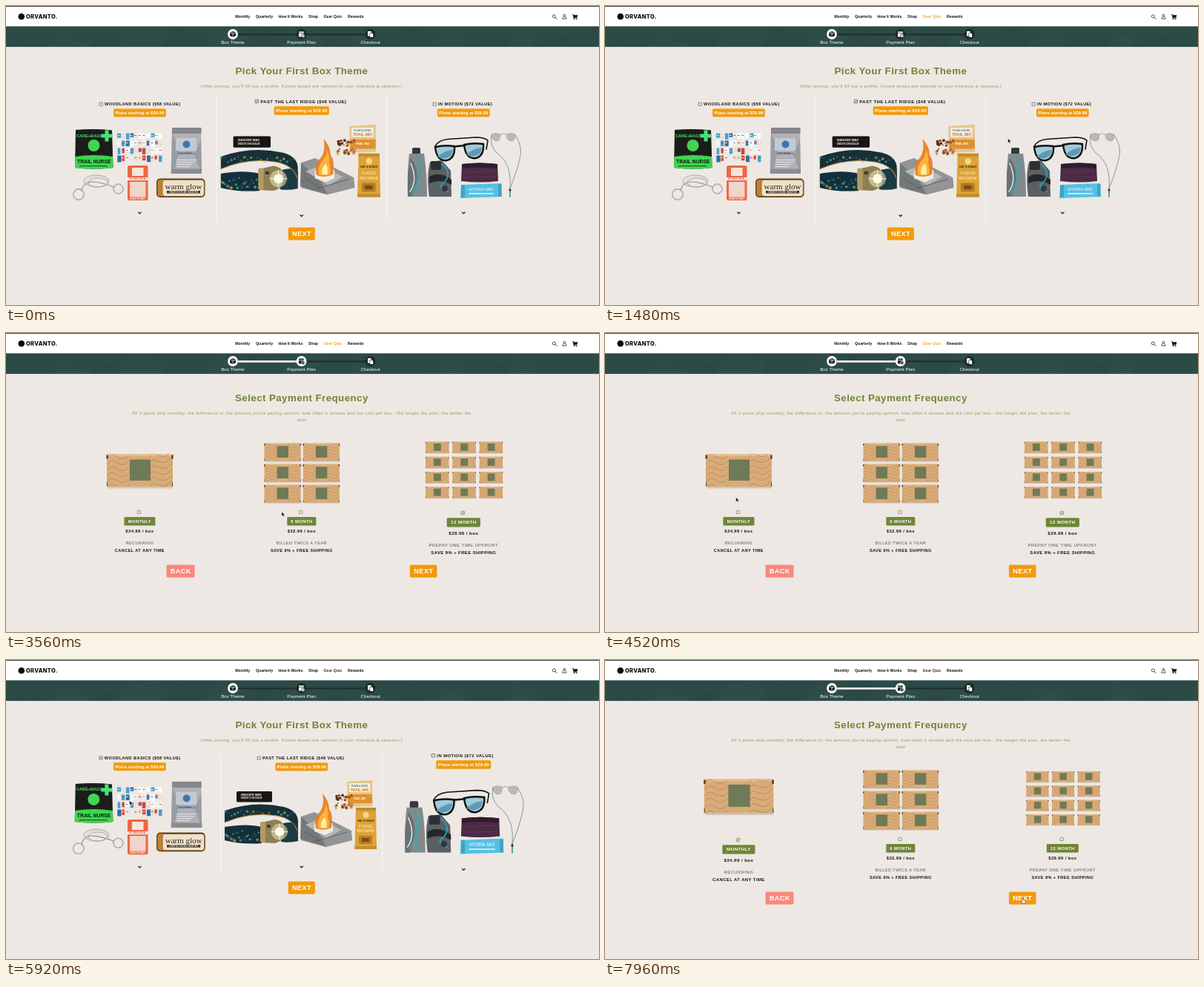
An HTML page for the animation above (8000 ms loop, 800x403 px).

```html
<!DOCTYPE html>
<html lang="en">
<head>
<meta charset="utf-8">
<title>Box sign-up</title>
<style>
html, body { margin: 0; height: 100%; overflow: hidden; background: #ede8e3; }
svg { display: block; width: 100vw; height: 100vh; }
text { font-family: "Liberation Sans", Arial, sans-serif; white-space: pre; }
.b { font-weight: 700; }
.m { text-anchor: middle; }
.s { letter-spacing: .417px; }
.logo { font-family: Inter, sans-serif; font-weight: 800; letter-spacing: .3px; }
.serif { font-family: "Liberation Serif", serif; }
</style>
</head>
<body>
<svg id="stage" viewBox="0 0 800 403"></svg>
<script>
const LOOP = 8000;
const COL = [180.4, 398.8, 617.3];
const ORANGE = '#f29a0a', GREEN = '#6f8538', INK = '#151515';
// moments of the clicks
const PICK3 = 1700, GO1 = 2300, MONTHLY = 4650, BACK = 5350, PICK1 = 5915, OPEN = 6800, GO2 = 7230;

let seed = 7;
const rnd = () => (seed = seed * 16807 % 2147483647) / 2147483647;

// ---- drawing helpers (text y is the middle of the capitals)
const text = (x, y, s, size, fill, cls = '', more = '') =>
  `<text x="${x}" y="${y + size * .36}" font-size="${size}" fill="${fill}" class="${cls}" ${more}>${s}</text>`;
const rect = (x, y, w, h, fill, r = 0, more = '') =>
  `<rect x="${x}" y="${y}" width="${w}" height="${h}" rx="${r}" fill="${fill}" ${more}/>`;
const circle = (x, y, r, fill, more = '') => `<circle cx="${x}" cy="${y}" r="${r}" fill="${fill}" ${more}/>`;
const path = (d, fill, more = '') => `<path d="${d}" fill="${fill}" ${more}/>`;
const line = (d, color, w = 1, more = '') =>
  path(d, 'none', `stroke="${color}" stroke-width="${w}" stroke-linecap="round" stroke-linejoin="round" ${more}`);
const group = (id, body, more = '') => `<g id="${id}" ${more}>${body}</g>`;

const checkbox = (id, x, y, color) =>
  rect(x - 2.1, y - 2.1, 4.2, 4.2, 'none', .4, `stroke="${color}" stroke-width=".7"`) +
  line(`M${x - 1.2} ${y}l.9 1 1.6-2.1`, color, .7, `id="${id}"`);
const button = (id, x, y, w, label, fill) =>
  group(id, rect(x - w / 2, y - 8.4, w, 16.8, fill, 1.6) + text(x + .2, y, label, 9.17, '#fff', 'b m s'));

// ---- header
function header() {
  const nav = [[309.3, 'Monthly'], [337, 'Quarterly'], [367.5, 'How It Works'], [408, 'Shop'], [428.5, 'Gear Quiz'], [461, 'Rewards']];
  let s = rect(0, 0, 800, 28, '#fff') + rect(0, 0, 800, 1, '#45454a');
  s += circle(20.8, 14.3, 4.3, '#0b0b0b') + text(27, 14.2, 'ORVANTO.', 7.5, '#0b0b0b', 'logo');
  s += nav.map(([x, n]) => text(x, 14, n, 5.2, INK, 'b', n === 'Gear Quiz' ? 'id="quiz"' : '')).join('');
  s += circle(739.4, 13.9, 2, 'none', 'stroke="#222" stroke-width=".8"') + line('M741 15.5l2 2', '#222', .9);
  s += circle(753.4, 12.7, 1.4, 'none', 'stroke="#222" stroke-width=".8"') +
    line('M752.4 14.2c-1 .6-1.6 1.6-1.6 3h5.2c0-1.4-.6-2.4-1.6-3', '#222', .8);
  s += path('M763.8 11.2h1.8l.4 1h5.4l-1 3.5h-4l.2.7h3.8v.7h-4.6l-1-5h-1z', '#0b0b0b') +
    circle(766.5, 17.5, .8, '#0b0b0b') + circle(769.8, 17.5, .8, '#0b0b0b');

  s += rect(0, 27.4, 800, 27.7, '#2c4a46');
  for (let i = 0; i < 16; i++) {
    const x = i * 52 - 10 + rnd() * 20, w = 20 + rnd() * 40;
    s += path(`M${x} 55l${w * .4} -${10 + rnd() * 17}l${w * .3} 6l${w * .5} ${-4 + rnd() * 8}V55z`,
      i % 2 ? '#355650' : '#24403d', 'opacity=".25"');
  }
  s += rect(306, 37.2, 186, 2.4, '#22302f') + rect(313, 37.1, 0, 2.6, '#fff', 0, 'id="fill"');
  const cut = 'var(--disc)';
  const icons = [
    path('M0-4L4-2.2V2.2L0 4L-4 2.2V-2.2z', 'currentColor') + line('M-3.8-2L0-.3L3.8-2M0-.3V3.8M-2-3L1.8-1.2', cut, .6),
    path('M-3.6-3.2H-2.4V-4H-1.4V-3.2H1V-4H2V-3.2H3.2V3.6H-3.6z', 'currentColor') + line('M-3.2-1.4H2.8', cut, .7) +
      circle(2.2, 2.2, 2.3, 'currentColor', `stroke="${cut}" stroke-width=".7"`) + line('M2.2 1V2.3H3.2', cut, .5),
    path('M-3.6-4H1V-2H-1V2.4H-3.6z', 'currentColor') + path('M-.4-1.4H2.2L3.6 0V4H-.4z', 'currentColor')
  ];
  ['Box Theme', 'Payment Plan', 'Checkout'].forEach((n, i) => {
    const x = [306, 398.6, 491.6][i];
    s += `<g id="step${i}" transform="translate(${x} 38)">${circle(0, 0, 6.9, cut)}${icons[i]}</g>` +
      text(x, 49, n, 6.2, '#fff', 'm');
  });
  return s;
}

// ---- products
function woodland() {
  let s = path('M94 167Q119 165 143 167.5L144.5 218Q119 221 93 218z', '#1b1d1b');
  s += path('M93.3 203Q119 199 144 203L144.5 218Q119 221 93 218z', '#3fd551');
  s += text(95, 174.5, 'CARE+BAGS', 5.6, '#4edb68', 'b');
  s += path('M133.5 167.5h5v5h5v5h-5v5h-5v-5h-5v-5h5z', '#4be07a');
  s += circle(118.5, 188, 8, '#3fd551') + text(118.8, 209.3, 'TRAIL NURSE', 6.8, '#0d1a0e', 'b m');
  s += rect(99, 215, 38, 1.2, '#1b5c25');
  const tints = ['#d9483b', '#4aa0cf', '#f7f7f5', '#e8e9ea', '#2e6fa6', '#f3d9cf', '#fff'];
  for (let r = 0; r < 4; r++)
    for (let c = 0; c < 11; c++)
      s += rect(150 + c * 5.6 + rnd(), 171.5 + r * 10, 3 + rnd() * 2.4, 5 + rnd() * 4, tints[rnd() * 7 | 0], .5) +
        rect(151 + c * 5.6, 174 + r * 10, 2.5, 1, tints[rnd() * 5 | 0]);
  s += path('M224 164H263L264 226H222.5z', '#b0b1b7') + rect(224, 164, 39.5, 8, '#85858b');
  s += path('M224 172l10 20-8 34h-3zM263 180l-9 20 10 26z', '#9a9ca3');
  s += rect(229, 178, 28, 17, '#c3c9d2') + circle(243.5, 186.5, 5, '#3a78b5');
  s += text(243.5, 198.5, 'SNOWBELL', 4, '#3a4a62', 'b m');
  for (let i = 0; i < 4; i++) s += rect(230, 207 + i * 3, 27 - i * 3, 1, '#e6e7ea');
  s += rect(223, 219.5, 41, 6.5, '#8b8b91');
  s += line('M102 249Q105 236 118 237T145 244', '#8c9090', 1.1);
  for (let i = 0; i < 3; i++)
    s += `<ellipse cx="${122 + i}" cy="${236 + i}" rx="${17 - i * 2}" ry="${8 - i}" fill="none" stroke="${i % 2 ? '#c8caca' : '#979a9a'}" stroke-width=".8"/>`;
  for (const [x, y, r] of [[98, 254, 7.2], [151.5, 246.5, 6.5]])
    s += circle(x, y, r, 'none', 'stroke="#8f9293" stroke-width="1.4"') + circle(x, y, r, 'none', 'stroke="#e0e1e1" stroke-width=".5"');
  s += rect(164, 215, 27.5, 47, '#ef6545', 2.5) + rect(170, 218, 15.5, 11, '#f9e4da') +
    rect(164, 231, 27.5, 4, '#fbf3ef') + text(177.7, 233, 'OUTINGS DECAL', 2.8, '#d6523a', 'b m') +
    rect(167, 237, 21.5, 20.5, '#f2d5ca') + text(177.7, 259.7, 'SCAN TO START', 2.6, '#fff', 'b m');
  s += rect(203, 232.5, 65.5, 25.5, '#5a3a20', 5) + rect(204.3, 234, 12, 22.5, '#c0812f', 4) +
    rect(211, 234.3, 56.3, 22.2, '#efe2c8', 4, 'stroke="#8a5a2a" stroke-width=".8"');
  s += text(239.5, 243, 'warm glow', 11, '#2b2420', 'serif m');
  s += rect(217, 249, 45, 3.5, '#3a302a') + text(239.5, 250.8, 'STARTER FOR ANY WEATHER', 2.7, '#efe2c8', 'b m');
  return s;
}

function ridge() {
  let s = rect(311, 177, 48, 14.5, '#161616', 1.5) + rect(316, 180, 29, 8.5, '#24221f');
  s += text(331, 181.8, 'BADGER WAX', 4, '#eee', 'b m') + text(331, 186.4, 'UNDER CHIN BALM', 3, '#ddd', 'b m');
  s += path('M295 203Q335 189 375 198Q394 203 394 218V232Q386 213 366 210Q330 204 295 219z', '#163039');
  s += path('M295 225Q325 220 345 225V247Q318 249 295 243z', '#12303b');
  s += path('M374 220Q394 216 394 224V244Q382 247 371 245z', '#1a3c44');
  const glints = ['#2f8fae', '#1d5a7a', '#6f9b4a', '#2bb0a0', '#d0a24a'];
  for (let i = 0; i < 46; i++) {
    const x = 296 + i % 23 * 2.05, low = i > 22;
    s += circle(low ? x : 296 + i * 4.2, low ? 227 + rnd() * 17 : 203 + rnd() * 7, .6 + rnd() * 1.4, glints[i % 5], 'opacity=".75"');
  }
  s += line('M295 219Q330 204 366 210Q388 214 393 230', '#b98a3c', 1);
  s += path('M345 219L362 215Q376 216 376 230Q376 244 362 247L345 246z', '#8d8054') + rect(343, 218, 7, 28, '#b59a63', 2);
  s += circle(369, 231.5, 11, '#f7efc0', 'opacity=".5"') + circle(369, 231.5, 6, '#fffbe6') +
    line('M369 221V242M358 231.5H380', '#fffdf0', .9) + rect(352, 222, 5, 4, '#3a3a34', 1);

  s += path('M398 211L416 205L466 230L467 243L432 252L398 243z', '#929496') + path('M398 211L424 236L432 252L397 241z', '#75787b');
  s += path('M404 222L424 214L452 229L433 240z', '#b7b8b8') + line('M412 246L460 232M404 232l20 12', '#5b5f61', .9);
  s += path('M416 221L429 216L441 220V231L430 236L416 231z', '#f1ece5');
  s += path('M418 227Q415 212 424 204Q430 195 427 180Q436 190 436 201Q442 209 439 226Q430 231 418 227z', '#ec7c22', 'opacity=".92"');
  s += path('M421 226Q419 214 427 207Q432 200 431 193Q436 204 434 212Q437 220 435 226Q428 229 421 226z', '#f9b53a') +
    path('M425 226Q424 217 430 212Q433 218 432 226z', '#fff0b0');

  s += path('M460 164L494 162L494.5 197L461 198z', '#e6c68c') + rect(463, 166, 28, 12, '#f3efe4');
  s += text(477, 170, 'PLAIN & GOOD', 3, '#56735a', 'b m') + text(477, 175, 'TRAIL MIX', 5, '#d67a1c', 'b m') +
    rect(461, 181, 33, 12, '#e0912e') + text(477, 187, 'TRAIL MIX', 3.4, '#fff', 'b m');
  const nuts = ['#8a4b22', '#d58b3c', '#5b2f1a', '#c8a064', '#a93b22'];
  for (let i = 0; i < 42; i++)
    s += circle(445 + rnd() * 23, 182 + rnd() * 18, 1 + rnd() * 1.3, nuts[i % 5]);
  s += path('M472 199L499 200L500 255L470.5 255z', '#dda338') + rect(472, 199, 27, 4, '#c48c2a') + rect(470.5, 251, 29.5, 4, '#c48c2a');
  s += circle(485.5, 209, 4, '#f3d98c') + text(485.5, 216.5, 'OAT & ROAST', 3.4, '#3b2812', 'b m') +
    text(485.5, 224, 'FUDGE', 5.4, '#fff3d4', 'm') + text(485.5, 230.5, 'BROWNIE', 5, '#fff3d4', 'm');
  s += rect(476, 237, 18, 11, '#b97a20', 2) + rect(480, 240, 10, 5, '#7a4a1e', 1);
  return s;
}

function motion() {
  let s = rect(548, 191, 11, 9, '#34383b', 2) + path('M544 199H564Q568 226 568 257H542Q541 225 544 199z', '#84898c');
  s += path('M546 205Q562 222 548 257H542V225z', '#6a7073') + line('M553 203Q567 220 547 253M563 212Q549 230 560 256', '#33a9ae', 1.6) +
    line('M546 212Q556 235 545 250', '#dfe4e4', 1.5);
  s += path('M572 210L588 208L600 222L601 257H571Q567 230 572 210z', '#5b6064') + rect(573, 209, 14, 12, '#2c3033', 2) +
    path('M571 230Q585 222 601 234V241Q586 232 571 239z', '#24282b') + line('M588 213Q602 224 592 237Q580 244 596 250', '#2aa3b0', 1.7) +
    circle(592, 246, 4, '#33383c');
  s += line('M579 189Q583 181 596 179.5L634 177Q645 177 650 181L648 193', '#141414', 1.6);
  for (const [x, y] of [[591, 190], [630, 187]])
    s += path(`M${x - 12} ${y}Q${x} ${y - 3} ${x + 14} ${y - 1}Q${x + 15} ${y + 15} ${x + 4} ${y + 18}Q${x - 10} ${y + 20} ${x - 12} ${y}z`,
      '#9ccbd9', 'stroke="#111" stroke-width="2.4"') +
      path(`M${x - 9} ${y + 13}Q${x + 2} ${y + 4} ${x + 12} ${y + 4}L${x + 10} ${y + 11}Q${x} ${y + 19} ${x - 9} ${y + 13}z`, '#6199b3');
  s += line('M604 189.5L619 188', '#111', 2.4);
  for (const x of [661, 681])
    s += path(`M${x - 6} 173Q${x} 170 ${x + 6} 173Q${x + 6} 183 ${x} 182Q${x - 6} 181 ${x - 6} 173z`, '#bab9b6', 'stroke="#9a9996" stroke-width=".6"');
  s += line('M667 173q4-2 8 0', '#8f8d89', .7) + line('M655 174Q652 188 662 198Q683 212 680 246M687 174Q698 190 693 206Q689 224 680 246', '#7d8f92', .9);
  s += line('M680 246V257', '#2f8f96', 1.6) + circle(680, 248, 1.6, '#333');
  s += path('M615 213Q640 210 663 213L664 236Q640 239 614 236z', '#4c2a46') + path('M615 213Q640 210 663 213V219Q640 216 615 219z', '#321a2f') +
    line('M618 224L660 222M617 231L661 230', '#5f3958', .8);
  s += path('M614 241L668 239L669 257L613 259z', '#55c0e3') + rect(614, 241, 5, 17, '#3aa5cc') + rect(664, 240, 4.5, 17, '#3aa5cc') +
    text(641, 247, 'HYDRA-MIX', 6, '#fff', 'm') + rect(624, 252, 34, 1.6, '#d9f2fa');
  return s;
}

const THEMES = [
  [133, 'WOODLAND BASICS ($58 VALUE)', woodland],
  [346, 'PAST THE LAST RIDGE ($48 VALUE)', ridge],
  [583, 'IN MOTION ($72 VALUE)', motion]
];

const heading = (title, lines) => text(398.9, 87, title, 13.33, GREEN, 'b m s') +
  lines.map((n, i) => text(398.9, 108.1 + i * 8.6, n, 5.833, '#8f9a5c', 'm s')).join('');

function themePage() {
  let s = heading('Pick Your First Box Theme',
    ["(After joining, you'll fill out a profile. Future boxes are tailored to your interests &amp; seasons.)"]);
  THEMES.forEach(([x, label, art], i) => {
    const c = COL[i];
    let g = checkbox('tick' + i, x - 4.8, 132.2, '#555') + text(x, 132.2, label, 5.625, INK, 'b s');
    g += rect(c - 35.3, 138.5, 70.6, 11, ORANGE, 1.8) + text(c, 143.9, 'Plans starting at $29.99', 5.833, '#fff', 'b m', 'letter-spacing=".05"');
    if (i === 1) g += line('M289.6 126V285M508 126V285', '#f8f6f3', 1);
    g += art() + line(`M${c - 1.8} 278l1.8 1.8 1.8-1.8`, '#111', 1.1, `id="chev${i}"`);
    if (i === 0) g += group('inside', inside());
    s += group('theme' + i, g);
  });
  return s + button('next1', 398.8, 307, 36, 'NEXT', ORANGE);
}

function inside() {
  const items = ['Our Nurse Trail Aid Bag', 'Warm Glow Emergency Tinder Kit', 'TopGlen Pocket Wire Saw', 'Solvane Outings Hi-Viz Decal', 'Snowbell Gel Instant Cold Pack'];
  let s = rect(76.3, 273, 208.5, 11.5, 'none', 0, 'stroke="#555" stroke-width=".6" stroke-dasharray="1 .8"');
  s += text(180.4, 289.4, "What's Inside", 7, '#222', 'b m') + rect(159.8, 292.7, 41.5, .6, '#222');
  items.forEach((n, i) => {
    const y = 299.9 + i * 8.2;
    s += circle(142.5, y, .9, '#333') + text(145.8, y, n, 5.2, '#444');
  });
  return s;
}

// ---- payment page
function kraftBox() {
  let lines = '';
  for (let i = 0; i < 6; i++) {
    const y = i * 8;
    lines += `M1 ${y + 5}C10 ${y - 9} 16 ${y + 16} 30 ${y + 1}M58 ${y + 4}C66 ${y - 10} 72 ${y + 14} 88 ${y - 4}`;
  }
  return rect(1, 3, 88, 43, '#b9b1a8', 2, 'opacity=".6"') + rect(0, 0, 89, 43.5, '#d9ab77', 1) +
    rect(1.5, 0, 86, 2.5, '#e6bf8f') + `<g clip-path="url(#boxClip)">${line(lines, '#9a7048', .5)}</g>` +
    rect(-.6, 1, 2.4, 5, '#5d3b20') + rect(87.2, 1, 2.4, 5, '#5d3b20') +
    line('M.5 38V43M88.5 38V43', '#7a4e2b', 1.2) + rect(31, 7, 28, 28.5, '#6f7a58');
}

const use = (x, y, w) => `<use href="#kraft" transform="translate(${x} ${y}) scale(${w / 89})"/>`;

function stack(cols, rows, xs, ys, w) {
  let s = '';
  for (let r = 0; r < rows; r++)
    for (let c = 0; c < cols; c++) s += use(xs[0] + c * xs[1], ys[0] + r * ys[1], w);
  return s;
}

const PLANS = [
  ['MONTHLY', 42, '$34.99', 'RECURRING', 'CANCEL AT ANY TIME', () => use(136, 163.5, 89)],
  ['6 MONTH', 39, '$32.99', 'BILLED TWICE A YEAR', 'SAVE 6% + FREE SHIPPING', () => stack(2, 3, [348.5, 52.3], [148.5, 28], 49)],
  ['12 MONTH', 43, '$29.99', 'PREPAY ONE TIME UPFRONT', 'SAVE 9% + FREE SHIPPING', () => stack(3, 4, [568.5, 34.6], [150, 19.3], 29.8)]
];

function planPage() {
  let s = heading('Select Payment Frequency',
    ["All 3 plans ship monthly, the difference is: the amount you're paying upfront, how often it renews and the cost per box - the longer the plan, the better the", 'deal']);
  PLANS.forEach(([name, w, price, how, perk, art], i) => {
    const c = COL[i];
    s += group('plan' + i, art() + checkbox('mark' + i, c - 1, 241.5, GREEN) +
      rect(c - w / 2, 248, w, 11.6, GREEN, 1.4) + text(c, 253.7, name, 5.833, '#fff', 'b m s') +
      text(c, 267.3, price + ' / box', 5.833, INK, 'b m s') +
      text(c, 282.5, how, 5.65, '#555', 'm s') + text(c, 292.7, perk, 5.625, INK, 'b m s'));
  });
  return s + button('back', 235.5, 321, 38, 'BACK', '#fb877c') + button('next2', 563.2, 321, 36.5, 'NEXT', ORANGE);
}

const arrow = path('M0 0V6.3L1.5 5L2.5 7.3L3.6 6.8L2.6 4.6H4.5z', '#111', 'stroke="#fff" stroke-width=".5"');
const hand = path('M-.7 0Q0-.8.7 0V2.6L3.2 3.2Q3.8 3.4 3.7 4.2L3.2 7H-.4L-2.4 4.4Q-2 3.6-.7 4.4z', '#fff', 'stroke="#222" stroke-width=".5"');

const stage = document.getElementById('stage');
stage.innerHTML = `<defs><clipPath id="boxClip">${rect(0, 0, 89, 43.5, '#000')}</clipPath>${group('kraft', kraftBox())}</defs>` +
  rect(0, 0, 800, 403, '#ede8e3') + group('page1', themePage()) + group('page2', planPage()) + header() +
  group('cursor', group('arrow', arrow, 'transform="translate(-1.5 -2.7)"') + group('hand', hand));

const el = {};
stage.querySelectorAll('[id]').forEach(n => el[n.id] = n);
const show = (n, on) => n.style.display = on ? '' : 'none';

// ---- motion
const clamp = x => Math.max(0, Math.min(1, x));
const smooth = x => (x = clamp(x), x * x * (3 - 2 * x));
const easeOut = x => 1 - Math.pow(1 - clamp(x), 2.32);

// time, x, y
const TRACK = [
  [0, 440, -9], [250, 440, 14], [800, 476, 66], [1480, 545, 181], [1680, 600, 140], [2240, 398, 307], [2360, 398, 307],
  [2600, 387, 302], [3400, 400, 246], [4000, 250, 232], [4520, 178, 224], [4640, 179, 241], [4800, 179, 241],
  [5250, 236, 321], [5400, 236, 321], [5860, 168, 192], [5960, 168, 192], [6450, 181, 279], [6830, 181, 279],
  [7080, 367, 338], [7210, 399, 360], [7400, 399, 360], [7900, 563, 321], [8000, 564, 321]
];

function cursorAt(t) {
  const i = Math.max(1, TRACK.findIndex(k => k[0] > t));
  const [t0, x0, y0] = TRACK[i - 1], [t1, x1, y1] = TRACK[i];
  const k = smooth((t - t0) / (t1 - t0));
  return [x0 + (x1 - x0) * k, y0 + (y1 - y0) * k];
}

const over = (x, y, cx, cy, w, h) => Math.abs(x - cx) < w / 2 && Math.abs(y - cy) < h / 2;

// chosen during [from, to); the card grows by 5 %
function choose(card, tick, c, cy, t, from, to) {
  const k = 1 + .05 * (easeOut((t - from) / 250) - easeOut((t - to) / 250));
  card.setAttribute('transform', `translate(${c} ${cy}) scale(${k}) translate(${-c} ${-cy})`);
  show(tick, t >= from && t < to);
}

function draw(t) {
  const plans = t >= GO1 && t < BACK || t >= GO2;
  show(el.page1, !plans);
  show(el.page2, plans);

  const open = easeOut((t - OPEN) / 120);
  choose(el.theme0, el.tick0, COL[0], 205.5 + 26.5 * open, t, PICK1, Infinity);
  choose(el.theme1, el.tick1, COL[1], 205.5, t, -1e6, PICK3);
  choose(el.theme2, el.tick2, COL[2], 205.5, t, PICK3, PICK1);
  choose(el.plan0, el.mark0, COL[0], 222, t, MONTHLY, Infinity);
  choose(el.plan1, el.mark1, COL[1], 222, t, Infinity, Infinity);
  choose(el.plan2, el.mark2, COL[2], 222, t, -1e6, MONTHLY);

  show(el.inside, t >= OPEN);
  el.chev0.setAttribute('transform', t >= OPEN ? `rotate(180 ${COL[0]} 278.9)` : '');
  el.next1.setAttribute('transform', `translate(0 ${53 * open})`);

  const filled = plans ? easeOut((t - (t < BACK ? GO1 : GO2)) / 600) : 0;
  el.fill.setAttribute('width', 79 * filled);
  [true, filled >= .99, false].forEach((on, i) => {
    el['step' + i].style.setProperty('--disc', on ? '#fff' : '#1c2a29');
    el['step' + i].style.color = on ? '#1c2423' : '#fff';
  });
  el.quiz.setAttribute('fill', t < 250 ? INK : t < BACK ? '#f0a62c' : '#3f2c12');

  const [x, y] = cursorAt(t);
  const link = plans
    ? over(x, y, 235.5, 321, 38, 17) || over(x, y, 563, 321, 37, 17)
    : over(x, y, 398.8, 307 + 53 * open, 36, 17) || over(x, y, 181, 279, 20, 8);
  show(el.arrow, !link);
  show(el.hand, link);
  el.cursor.setAttribute('transform', `translate(${x} ${y})`);
}

function tick() {
  draw(performance.now() % LOOP);
  requestAnimationFrame(tick);
}
tick();
</script>
</body>
</html>
```
